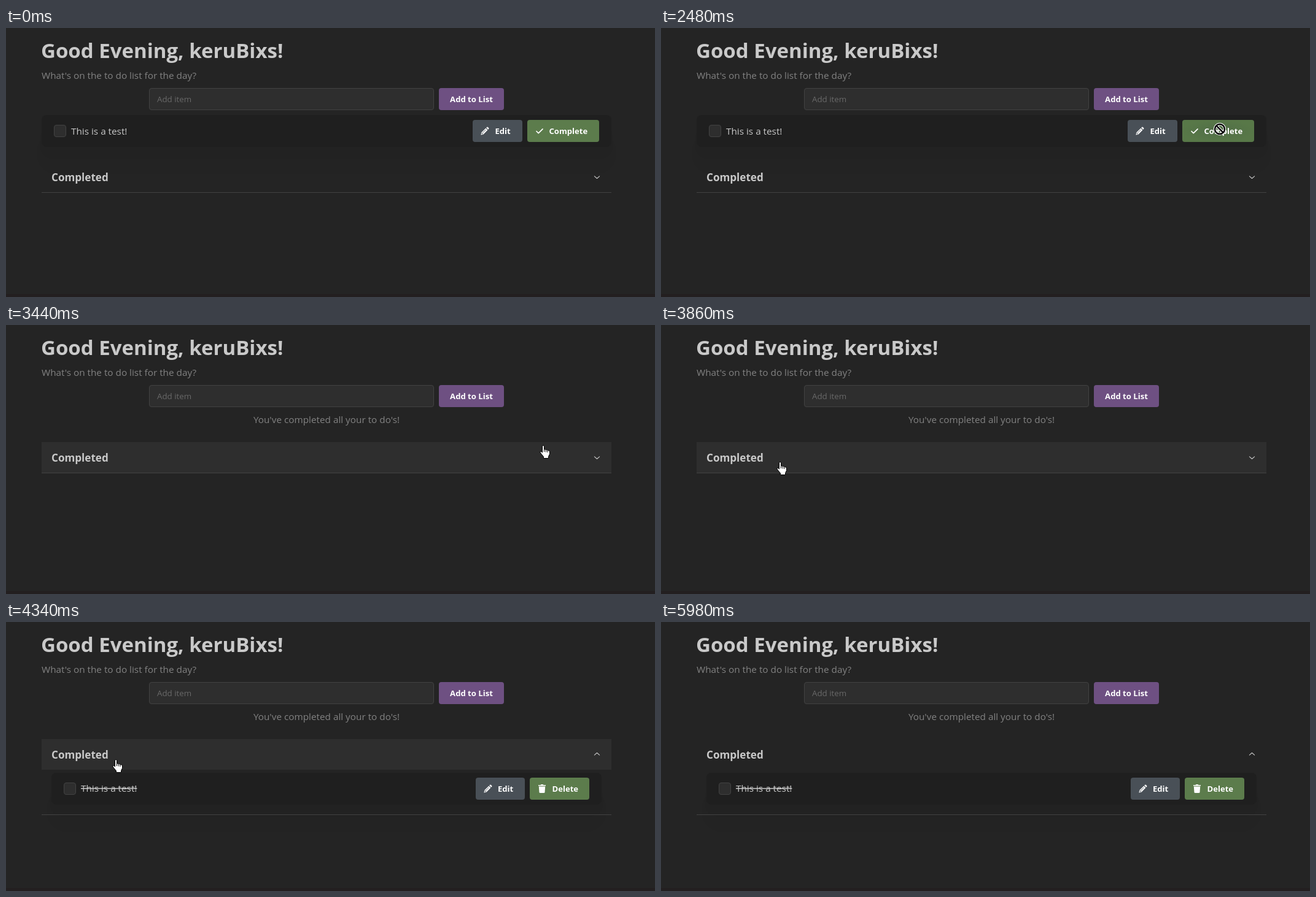
Animation, 1057 px wide and 439 px high, one loop 6840 ms. Source, as an HTML page:

```html
<!DOCTYPE html>
<html lang="en">
<head>
<meta charset="utf-8">
<title>To do list</title>
<style>
  html, body { margin: 0; width: 100%; height: 100%; overflow: hidden; background: #242424; }
  #stage { display: block; width: 1057px; height: 439px; }
  text { font: 15.3px "Open Sans", "Noto Sans", sans-serif; fill: #c9c9c9; white-space: pre; }
  .title { font-size: 33px; font-weight: 700; }
  .heading { font-size: 17.1px; font-weight: 700; }
  .dim { fill: #828282; }
  .hint { font-size: 13.3px; fill: #696969; }
  .label { font-size: 13.1px; font-weight: 700; fill: #fff; }
  .mid { text-anchor: middle; }
  .struck { text-decoration: line-through; }
  .field { fill: #2e2e2e; stroke: #424242; }
  .card { fill: #1f1f1f; }
  .gray { fill: #495057; }
  .green { fill: #5c7c4c; }
  .icon { fill: #fff; }
  .line { fill: none; stroke-linecap: round; stroke-linejoin: round; }
</style>
</head>
<body>
<svg id="stage" viewBox="0 0 1057 439">
  <defs>
    <filter id="soft" x="-10%" y="-150%" width="120%" height="400%"><feGaussianBlur stdDeviation="14"/></filter>
    <filter id="near" x="-10%" y="-150%" width="120%" height="400%"><feGaussianBlur stdDeviation="8.5"/></filter>
    <radialGradient id="busy">
      <stop offset="0.2" stop-color="#527047"/><stop offset="1" stop-color="#587848"/>
    </radialGradient>
    <clipPath id="reveal"><rect id="revealBox" x="58" y="241" width="928" height="0"/></clipPath>
    <g id="pencil" class="icon">
      <path d="M.4 13.6 1.3 9.6 8.4 2.6 11.4 5.6 4.4 12.7Z"/>
      <path d="M9.2 1.8 10.2.8Q11 .1 11.8.8L13.2 2.2Q13.9 3 13.2 3.8L12.2 4.8Z"/>
      <path class="line" stroke="#495057" stroke-width=".9" d="M3.7 9.7 8.3 5.1M2.2 10.2V11.8H3.8"/>
    </g>
    <g id="trash" class="icon">
      <path d="M.5 1H4L5 0H8L9 1H12.5V2.6H.5Z"/>
      <path d="M1.3 3.5H11.7L11 12.7Q10.9 14 9.7 14H3.3Q2.1 14 2 12.7Z"/>
    </g>
  </defs>

  <rect width="1057" height="439" fill="#242424"/>
  <rect y="434" width="1057" height="5" fill="#231f20"/>

  <text class="title" x="57" y="49">Good Evening, keruBixs!</text>
  <text class="dim" x="58" y="83">What's on the to do list for the day?</text>
  <rect class="field" x="233.5" y="98.5" width="463" height="35" rx="3.5"/>
  <text class="hint" x="246" y="121">Add item</text>
  <rect x="705" y="98" width="106" height="36" rx="4" fill="#6e5082"/>
  <text class="label mid" x="758" y="121">Add to List</text>

  <g id="todo">
    <rect x="65" y="185" width="914" height="38" opacity=".03" filter="url(#soft)"/>
    <rect x="65" y="166" width="914" height="38" opacity=".03" filter="url(#near)"/>
    <rect class="card" x="58" y="142" width="928" height="52" rx="8"/>
    <rect class="field" x="78.5" y="158.5" width="19" height="19" rx="3.5"/>
    <text x="106" y="174">This is a test!</text>
    <rect class="gray" x="760" y="150" width="81" height="36" rx="4"/>
    <use href="#pencil" x="773" y="161"/>
    <text class="label" x="796.5" y="173">Edit</text>
    <svg x="849" y="150" width="117" height="36">
      <rect id="complete" width="117" height="36" rx="4"/>
      <g id="inner">
        <path class="line" stroke="#fff" stroke-width="1.7" d="M15 18.5 18.2 21.7 25 14.8"/>
        <text class="label" x="35.5" y="23">Complete</text>
      </g>
      <circle id="loader" r="8.75" fill="none" stroke="#fff" stroke-width="2.5" pathLength="4" stroke-dasharray="3 1"/>
    </svg>
  </g>

  <text id="empty" class="dim mid" x="522" y="160">You've completed all your to do's!</text>

  <g id="panel" clip-path="url(#reveal)">
    <rect x="81" y="289" width="882" height="38" opacity=".03" filter="url(#soft)"/>
    <rect x="81" y="270" width="882" height="38" opacity=".03" filter="url(#near)"/>
    <rect class="card" x="74" y="246" width="896" height="52" rx="8"/>
    <rect class="field" x="94.5" y="262.5" width="19" height="19" rx="3.5"/>
    <text class="struck" x="122" y="277">This is a test!</text>
    <rect class="gray" x="765" y="254" width="80" height="36" rx="4"/>
    <use href="#pencil" x="778" y="265"/>
    <text class="label" x="801" y="277">Edit</text>
    <rect class="green" x="853" y="254" width="97" height="36" rx="4"/>
    <use href="#trash" x="866.5" y="265"/>
    <text class="label" x="889.5" y="277">Delete</text>
  </g>

  <g id="row">
    <rect id="rowBack" x="58" width="928" height="50" fill="#2e2e2e"/>
    <text class="heading" x="74" y="32">Completed</text>
    <path id="chevron" class="line" stroke="#c9c9c9" stroke-width="1.1" d="M-4.1-1.1 0 2.5 4.1-1.1"/>
  </g>
  <rect id="rule" x="58" width="928" height="1" fill="#424242"/>

  <g id="cursor">
    <path id="arrow" fill="#000" stroke="#fff" d="M.5.5V16.2L4.2 12.8 6.6 18.3 9 17.3 6.6 12H11.5Z"/>
    <g id="hand" transform="translate(-7)" stroke="#000" stroke-linejoin="round">
      <path fill="#fff" d="M4.5 2.2Q4.5.5 6 .5T7.5 2.2V7.2Q9 6.3 10.3 7.8 11.8 7 13 8.6 16.5 8 16.5 11V14.5L14.5 18.5V21.5H6.5V19L2.5 14Q.3 11.6 1 10.6 2.3 9.6 4.5 12Z"/>
      <path fill="none" d="M7.5 7.2V11M10.3 8V11.5M13 9V12"/>
    </g>
    <g id="ban" fill="none">
      <path stroke="#fff" stroke-width="4.4" d="M-8 0A8 8 0 0 1 8 0 8 8 0 0 1-8 0M-5.6-5.6 5.6 5.6"/>
      <path stroke="#000" stroke-width="2.4" d="M-8 0A8 8 0 0 1 8 0 8 8 0 0 1-8 0M-5.6-5.6 5.6 5.6"/>
    </g>
  </g>
</svg>
<script>
const LOOP = 6840;
const ENTER = 1130, PRESS = 2480, DONE = 2950, OPEN = 4060, LEAVE = 5980;
const PANEL = 73;

// Pointer moves: start, step, positions of the hot spot
const moves = [
  [ENTER, 70, [[1050, 160], [1016, 161], [981, 162], [949, 163], [927, 164], [915, 164], [911, 164]]],
  [1950, 70, [[910, 164]]],
  [PRESS, 66.6, [[910, 165], [908, 167]]],
  [3300, 70, [[904, 172], [895, 182], [876, 196], [805, 212], [660, 222],
              [490, 227], [335, 228], [240, 226], [195, 223], [179, 221]]],
  [4340, 70, [[180, 224], [181, 236], [183, 258], [184, 276], [186, 290], [187, 298], [188, 305]]],
  [5500, 68.5, [[192, 308], [208, 315], [245, 328], [305, 345], [385, 364], [470, 382], [548, 397]]]
];

const $ = id => document.getElementById(id);
const clamp = v => Math.min(1, Math.max(0, v));
const show = (id, on) => $(id).setAttribute("display", on ? "inline" : "none");
const set = (id, name, value) => $(id).setAttribute(name, value);
const snap = (t, start, step) => Math.floor((t - start) / step) * step;

// cubic-bezier(.25, .1, .25, 1)
function ease(x) {
  x = clamp(x);
  if (x === 0 || x === 1) return x;
  const curve = (a, b, s) => 3 * a * s * (1 - s) ** 2 + 3 * b * s * s * (1 - s) + s ** 3;
  let lo = 0, hi = 1;
  for (let i = 0; i < 24; i++) {
    const s = (lo + hi) / 2;
    if (curve(.25, .25, s) < x) lo = s; else hi = s;
  }
  return curve(.1, 1, lo);
}

function pointer(t) {
  const move = moves.filter(m => t >= m[0]).pop();
  if (!move) return [-99, -99];
  const [start, step, pts] = move;
  return pts[Math.min(pts.length - 1, Math.floor((t - start) / step))];
}

function draw(t) {
  const [x, y] = pointer(t);
  const inside = (l, top, r, b) => x >= l && x < r && y >= top && y < b;
  const seen = t >= ENTER && t < LEAVE;
  const done = t >= DONE;
  const loading = t >= PRESS && !done;
  const overButton = seen && !done && inside(849, 150, 966, 186);
  const overRow = seen && done && inside(58, 191, 986, 241);

  show("todo", !done);
  show("empty", done);
  set("complete", "fill", loading ? "url(#busy)" : overButton ? "#4c6c3f" : "#5c7c4c");
  const busy = loading ? snap(t, PRESS, 66.6) : 0;
  const slide = ease(busy / 150);
  set("inner", "transform", `translate(0 ${36 * slide})`);
  set("inner", "opacity", 1 - ease(busy / 100));
  show("loader", loading);
  set("loader", "opacity", slide);
  set("loader", "transform", `translate(58.5 ${18 - 40 * (1 - slide)}) rotate(${225 + busy * .3})`);

  const open = t < OPEN ? 0 : ease((snap(t, OPEN, 70) - 33) / 200);
  const top = done ? 191 : 218;
  const height = Math.round(PANEL * open);
  set("row", "transform", `translate(0 ${top})`);
  show("rowBack", overRow);
  set("chevron", "transform", `translate(962.5 25) rotate(${180 * open})`);
  set("rule", "y", top + 50 + height);
  show("panel", open > 0);
  set("revealBox", "height", open === 1 ? 160 : height);

  show("cursor", seen);
  set("cursor", "transform", `translate(${x} ${y})`);
  show("ban", loading);
  show("hand", !loading && (overButton || overRow));
  show("arrow", !loading && !overButton && !overRow);
}

const begin = performance.now();
function tick() {
  draw((performance.now() - begin) % LOOP);
  requestAnimationFrame(tick);
}
tick();
</script>
</body>
</html>
```
